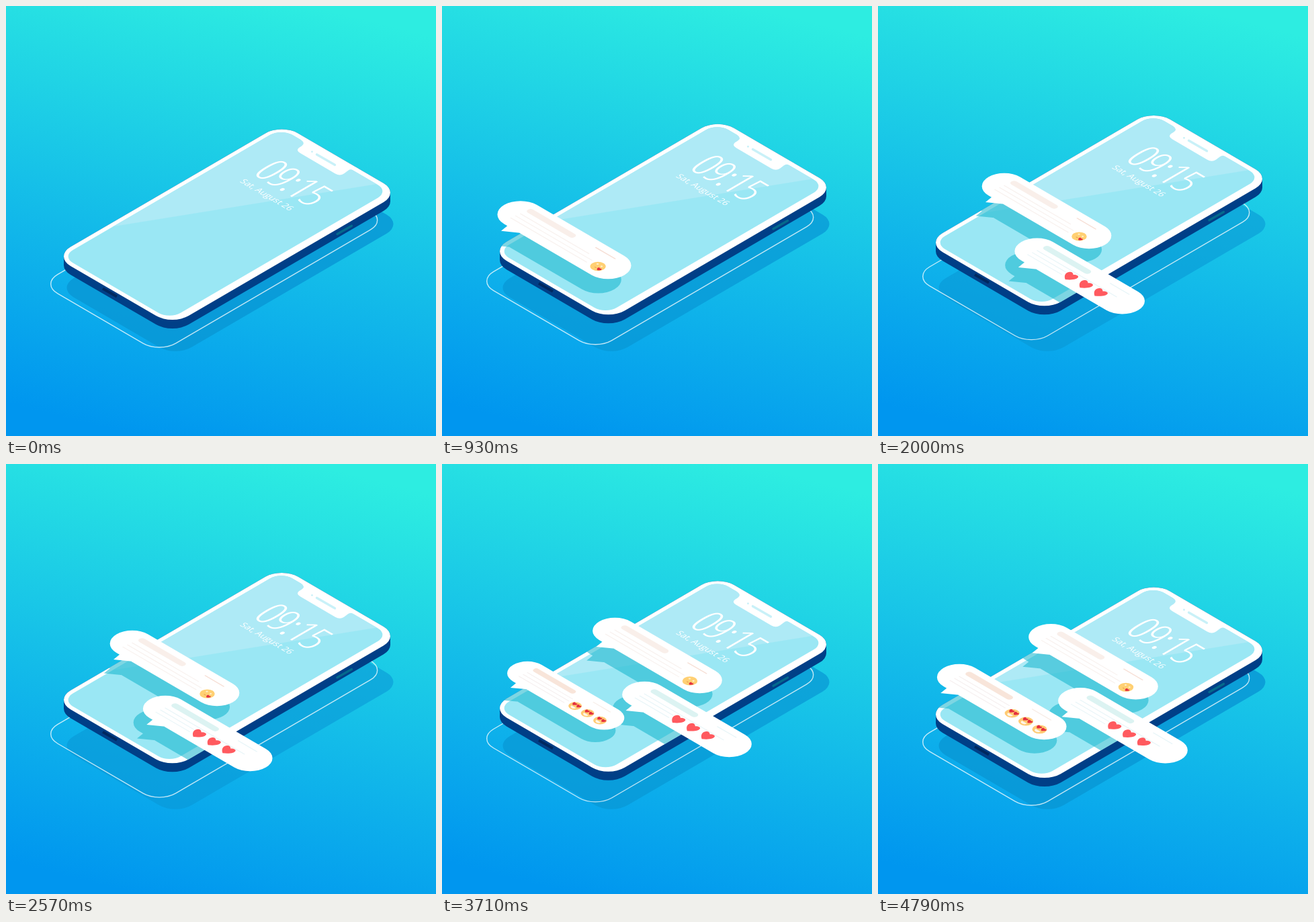
Animation of 640 by 640 pixels, one loop 4.87 s. Source, as an HTML page with a canvas:

```html
<!DOCTYPE html>
<html lang="en">
<head>
<meta charset="utf-8">
<title>Phone messages</title>
<style>
html, body { margin: 0; width: 100%; height: 100%; overflow: hidden; background: #16c1e8; }
canvas { display: block; width: 100vw; height: 100vh; }
</style>
</head>
<body>
<canvas id="stage" width="640" height="640"></canvas>
<script>
const ctx = document.getElementById('stage').getContext('2d');
const LOOP = 4870, FRAME = 500 / 7, LAST = 67;
const UX = 0.866, UY = 0.505;

// Isometric plane: x runs right-down, y runs right-up.
const plane = (x, y, s = 1) => new DOMMatrix([UX * s, UY * s, UX * s, -UY * s, x, y]);

function place(path, x, y, s) {
  const out = new Path2D();
  out.addPath(path, plane(x, y, s));
  return out;
}

function slab(a, b, r) {
  const p = new Path2D();
  p.roundRect(-a, -b, 2 * a, 2 * b, r);
  return p;
}

const body = slab(101.5, 195.5, 28);
const face = place(body, 329, 325.3);
const base = place(body, 329, 338.3);
const ground = place(body, 333.5, 372);
const screen = place(slab(92.6, 188.6, 19), 326.5, 324.3);
const walls = new Path2D('M86 373 L572 278 V291 L86 386 Z');
const notch = new Path2D('M434 194 L440 200 Q446 204.5 440 208.5 L436 211 Q431 215 438 219 ' +
  'L490 249.5 Q497 253.5 503 249.5 L509 245 Q513 241 522 247 L524 242 Z');
const glare = new Path2D('M80 341 L580 260.5 V150 H80 Z');

const bubble = slab(100, 27.2, 27.2);
bubble.addPath(new Path2D('M-68 -24 L-65.4 -39.7 L-46.9 -26.5 Z'));
const heart = new Path2D('M0 -6.5 C-12 1.5 -5.5 10.5 0 4.5 C5.5 10.5 12 1.5 0 -6.5 Z');

const sky = ctx.createLinearGradient(100, 616, 266, -47);
sky.addColorStop(0, '#0096ef');
sky.addColorStop(1, '#2dede1');

const MOVE = 600, SHIFTS = [1332, 3020];
const messages = [
  { born: 230, first: 0, stops: [[182, 356], [251, 325.7], [320.5, 294.3]],
    bar: '#f9efea', line: '#f8f1ee', stamp: '#f6ded4', ends: [40, 52, 50], extra: kiss },
  { born: 1480, first: 1, stops: [[300.2, 422.7], [364.5, 389.3]],
    bar: '#dcf3f2', line: '#e8f5f8', stamp: '#e8f5f8', ends: [62, -18, -18], extra: hearts },
  { born: 3260, first: 2, stops: [[184.2, 354]],
    bar: '#f8e5da', line: '#f6f0f0', stamp: '#f6ece6', ends: [12, 12, 10], extra: loveFaces }
];

const clamp = x => Math.min(1, Math.max(0, x));
const ease = x => (1 - Math.cos(Math.PI * clamp(x))) / 2;
const popScale = t => 1.05 * ease(t / 600) - 0.05 * ease((t - 600) / 250);

function fill(path, color) {
  ctx.fillStyle = color;
  ctx.fill(path);
}

function line(x1, y1, x2, y2, width, color, cap = 'round') {
  ctx.beginPath();
  ctx.moveTo(x1, y1);
  ctx.lineTo(x2, y2);
  ctx.lineCap = cap;
  ctx.lineWidth = width;
  ctx.strokeStyle = color;
  ctx.stroke();
}

function dot(x, y, r, color) {
  ctx.beginPath();
  ctx.arc(x, y, r, 0, 7);
  ctx.fillStyle = color;
  ctx.fill();
}

function drawHeart(x, y, s, color) {
  ctx.save();
  ctx.translate(x, y);
  ctx.scale(s, s);
  fill(heart, color);
  ctx.restore();
}

function kiss() {
  dot(65.6, -9.6, 9.2, '#ffd073');
  dot(62, -6.5, 1.4, '#fff1cf');
  dot(68.5, -6.5, 1.4, '#fff1cf');
  line(64, -13, 66, -13, 1.2, '#e9a04d');
  drawHeart(70.5, -13, 0.42, '#e4303f');
}

function hearts() {
  for (let i = 0; i < 3; i++) drawHeart(-7.4 + 24.6 * i, -9.3 + 0.6 * i, 1.25, '#ff5a5f');
}

function loveFaces() {
  for (let i = 0; i < 3; i++) {
    const x = 25.8 + 23.6 * i, y = -8;
    dot(x, y, 9, '#ffcb74');
    drawHeart(x - 3.8, y + 2.5, 0.5, '#e4303f');
    drawHeart(x + 3.8, y + 2.5, 0.5, '#e4303f');
    ctx.beginPath();
    ctx.arc(x, y - 2.5, 4.2, Math.PI, 0);
    ctx.fillStyle = '#fff6e6';
    ctx.fill();
  }
}

// Text on the glass, centred on a point; the size follows from the wanted length.
function label(text, x, y, weight, length, stretch, spacing) {
  const setFont = size => {
    ctx.font = `${weight} ${size}px "Open Sans", sans-serif`;
    ctx.fontStretch = stretch;
    ctx.letterSpacing = `${spacing * size}px`;
  };
  ctx.save();
  ctx.transform(UX, UY, -UX, UY, x, y);
  setFont(50);
  const size = 50 * length / ctx.measureText(text).width;
  setFont(size);
  ctx.textAlign = 'center';
  ctx.fillStyle = '#fff';
  ctx.fillText(text, 0, size * 0.356);
  ctx.restore();
}

function drawPhone() {
  for (const part of [base, walls, face]) fill(part, '#003f87');
  line(144, 420.5, 165, 432.5, 4, '#00285f', 'butt');
  line(493, 339.5, 514.5, 327.2, 3.4, '#046a8c');
  fill(face, '#fff');
  fill(screen, '#9ae7f4');
  ctx.save();
  ctx.clip(screen);
  fill(glare, '#aeeaf6');
  ctx.restore();
  fill(notch, '#fff');
  line(462.5, 221, 489.5, 236.5, 3.4, '#c9f1f8');
  dot(455.5, 217, 1.4, '#c9f1f8');
  label('09:15', 427, 262.5, 300, 98, 'condensed', -0.05);
  label('Sat, August 26', 388.5, 281, 400, 86, 'normal', 0);
}

function locate(m, t) {
  let [x, y] = m.stops[0];
  for (let i = 1; i < m.stops.length; i++) {
    const k = ease((t - SHIFTS[m.first + i - 1]) / MOVE);
    x += (m.stops[i][0] - m.stops[i - 1][0]) * k;
    y += (m.stops[i][1] - m.stops[i - 1][1]) * k;
  }
  return { m, x, y, s: popScale(t - m.born) };
}

function drawMessage({ m, x, y, s }) {
  ctx.save();
  const { a, b, c, d } = plane(0, 0, s);
  ctx.transform(a, b, c, d, x, y);
  fill(bubble, '#fff');
  line(-69, 13, 0, 13, 9, m.bar);
  m.ends.forEach((end, i) => line(-74 - i, 1 - 7 * i, end, 1 - 7 * i, 1.3, m.line));
  line(37, 15.5, 69, 15.5, 1.5, m.stamp);
  m.extra();
  ctx.restore();
}

function draw(t) {
  const lift = 11 * (1 - Math.cos(2 * Math.PI * (t + 55) / LOOP));
  ctx.fillStyle = sky;
  ctx.fillRect(0, 0, 640, 640);
  fill(ground, `rgba(9, 152, 214, ${0.85 - lift * 0.012})`);

  ctx.lineWidth = 1.4;
  ctx.strokeStyle = 'rgba(255, 255, 255, 0.75)';
  ctx.stroke(place(body, 309.7, 366.3 - lift * 0.55));

  ctx.save();
  ctx.translate(0, -lift);
  drawPhone();
  const shown = messages.filter(m => t > m.born).map(m => locate(m, t));

  const shade = new Path2D();
  for (const { x, y, s } of shown) shade.addPath(bubble, plane(x - 14.2 * s, y + 20.5 * s, s));
  ctx.save();
  ctx.clip(face);
  fill(shade, 'rgba(19, 180, 204, 0.55)');
  ctx.restore();

  shown.forEach(drawMessage);
  ctx.restore();
}

const start = performance.now();
function tick() {
  const t = (performance.now() - start) % LOOP;
  draw(Math.min(LAST, Math.floor((t + 5) / FRAME)) * FRAME);
  requestAnimationFrame(tick);
}
tick();
</script>
</body>
</html>
```
